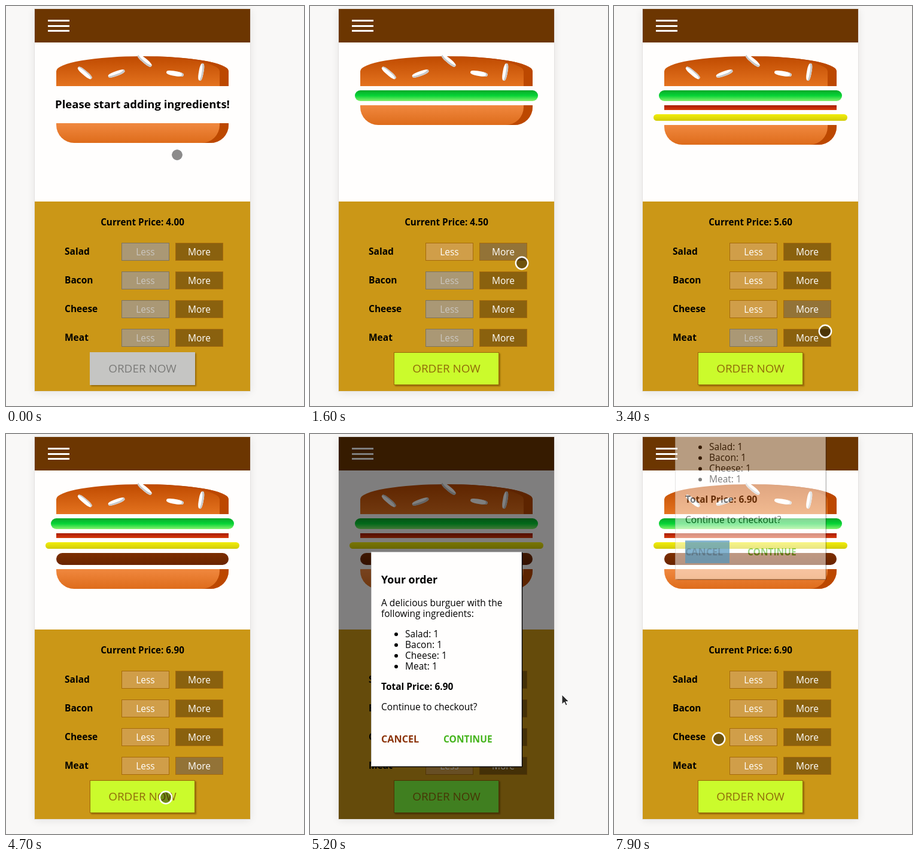
An HTML page that plays this animation: 498 px wide and 669 px high, repeating every 8000 ms.

```html
<!DOCTYPE html>
<html lang="en">
<head>
<meta charset="utf-8">
<title>Burger builder</title>
<style>
  html, body { margin: 0; width: 100%; height: 100%; overflow: hidden; background: #f9f8f7; }
  body { position: relative; font: 15.5px/18px 'Open Sans', 'Noto Sans', sans-serif; color: #000; }
  * { box-sizing: border-box; }
  [hidden] { display: none !important; }

  #frame, #phone { position: absolute; left: 48px; top: 5px; width: 360px; height: 639px; }
  #frame { box-shadow: 0 0 0 1px #e4e2e0, 0 2px 14px rgba(0, 0, 0, .09); }
  #phone { overflow: hidden; background: #fffefd; }
  #phone > * { position: absolute; }
  #header { width: 100%; height: 56px; background: #6c3601; }
  #header i { display: block; width: 36px; height: 3px; margin: 0 0 5.5px 22px; background: #fff; }
  #header i:first-child { margin-top: 18px; }
  #panel { top: 322px; width: 100%; bottom: 0; background: #cb9717; }
  #price { top: 347px; width: 100%; text-align: center; font-size: 15.25px; }

  #burger { top: 72px; width: 100%; }
  #burger > div { margin: 7.2px auto; width: 80%; }
  #burger .top { position: relative; height: 50px; border-radius: 50% 50% 0 0;
    background: linear-gradient(#bf4a00, #e4731f); box-shadow: inset -15px 0 #bc4800; }
  #burger .bottom { height: 32.5px; border-radius: 0 0 30px 30px;
    background: linear-gradient(#f0883f, #de6c1b); box-shadow: inset -15px 0 #bc4800; }
  #burger .salad { width: 85%; height: 17.5px; border-radius: 20px;
    background: linear-gradient(#08a82a, #06d436 50%, #86f06c); }
  #burger .bacon { height: 7.5px; background: linear-gradient(#a81c00, #d83a0c); }
  #burger .cheese { width: 90%; height: 11.25px; border-radius: 20px;
    background: linear-gradient(#f2ee08, #d2cc08); }
  #burger .meat { height: 20px; border-radius: 15px; background: linear-gradient(#7c2e00, #6a2400); }
  #burger .msg { width: 100%; height: 62px; margin: -7.2px 0; line-height: 60px;
    text-align: center; font-size: 18.5px; font-weight: 700; }

  .seed, .seed::before, .seed::after { position: absolute; width: 28.8px; height: 7.5px;
    border-radius: 40%; background: #fff; }
  .seed { top: 50%; left: 30%; transform: rotate(-20deg); box-shadow: inset -2px -3px #c9c9c9; }
  .seed::before { content: ""; left: 180%; top: -50%; transform: rotate(60deg);
    box-shadow: inset -1px -3px #c9c9c9; }
  .seed::after { content: ""; left: -170%; top: -260%; transform: rotate(60deg);
    box-shadow: inset -1px 2px #c9c9c9; }
  .seed.right { left: 64%; transform: rotate(10deg); box-shadow: inset -3px 0 #c9c9c9; }
  .seed.right::before { left: 150%; top: -130%; transform: rotate(90deg); box-shadow: inset 1px 3px #c9c9c9; }
  .seed.right::after { display: none; }

  #controls { top: 391px; width: 100%; }
  .row { display: flex; height: 30px; margin-bottom: 18px; padding-left: 50px; line-height: 29px; }
  .row b { width: 95px; }
  .row span { width: 80px; margin-right: 10px; line-height: 28px; text-align: center;
    border: 1px solid #a66a0c; color: #fff; }
  .less { background: #d09e49; }
  .less.off { background: #aa9875; border-color: #7d7361; color: #cac6c0; }
  .more { background: #8a610e; }
  .more.focus { background: #937337; }
  #order { left: 92px; top: 574px; width: 176px; height: 55px; line-height: 53px;
    text-align: center; font-size: 18.9px; border: 1px solid #966909; color: #8f6a0a;
    background: #cbfb2c; box-shadow: 2px 2px 2px #966909; }
  #order.off { background: #c5c5c3; border-color: #c5c5c3; color: #7b7b79; }
  #order.hover { background: #80ff40; }

  #backdrop { inset: 0; background: rgba(0, 0, 0, .5); }
  #modal { left: 54px; top: 192px; width: 252px; height: 359px; padding: 0 16px; background: #fffefd;
    border: 1px solid #ccc; box-shadow: 1px 1px 1px #000; }
  #modal h3 { margin: 34.7px 0 18.7px; font-size: 17.8px; line-height: 21.5px; }
  #modal p, #modal ul { margin: 16px 0; }
  #modal ul { padding-left: 40px; }
  #modal b.choice { display: inline-block; margin: 10px 10px 10px 0; padding: 10px 10px 10px 0; }
  #modal .cancel { color: #8c340a; font-size: 16.2px; }
  #modal .continue { color: #45b41c; position: absolute; left: 120px; }
  #tap { left: 71px; width: 74px; height: 38px; background: rgba(80, 150, 190, .7); }
  #pointer { position: absolute; left: 0; top: 0; overflow: visible; }
</style>
</head>
<body>
<div id="frame"></div>
<div id="phone">
  <div id="header"><i></i><i></i><i></i></div>
  <div id="burger">
    <div class="top"><span class="seed"></span><span class="seed right"></span></div>
    <div class="msg">Please start adding ingredients!</div>
    <div class="bottom"></div>
  </div>
  <div id="panel"></div>
  <b id="price"></b>
  <div id="controls"></div>
  <div id="order">ORDER NOW</div>
  <div id="backdrop"></div>
  <div id="modal">
    <h3>Your order</h3>
    <p>A delicious burguer with the<br>following ingredients:</p>
    <ul></ul>
    <p><b>Total Price: 6.90</b></p>
    <p>Continue to checkout?</p>
    <b class="choice cancel">CANCEL</b><b class="choice continue">CONTINUE</b>
  </div>
  <div id="tap"></div>
</div>
<svg id="pointer" width="1" height="1">
  <g id="touch">
    <circle r="9.2" fill-opacity=".45"/>
    <circle r="10.2" fill="none" stroke="#fff" stroke-width="2.4"/>
  </g>
  <path id="arrow" d="M0 0V16L4 12.5L6.5 18L9 17L6.5 11.5H11.5Z" fill="#2b2b2b" stroke="#fff"/>
</svg>
<script>
const $ = selector => document.querySelector(selector);
const LOOP = 8000, STEP = 100, GLIDE = 400, SLIDE = 300;
const OPEN = 4800, CLOSE = 7800;
const items = [
  { name: 'Salad', price: 0.5, added: 1300 },
  { name: 'Bacon', price: 0.7, added: 2200 },
  { name: 'Cheese', price: 0.4, added: 2900 },
  { name: 'Meat', price: 1.3, added: 4000 }
];

// Where the pointer comes to rest, and when it arrives
const stops = [
  { at: 0, x: 286, y: 249 },
  { at: 800, x: 335, y: 411 },
  { at: 1600, x: 354, y: 430 },
  { at: 2000, x: 346, y: 461 },
  { at: 2400, x: 370, y: 494 },
  { at: 2900, x: 346, y: 507 },
  { at: 3400, x: 353, y: 544 },
  { at: 3800, x: 343, y: 552 },
  { at: 4700, x: 267, y: 608 },
  { at: 5200, x: 421, y: 436 },
  { at: 5700, x: 204, y: 519 },
  { at: 6500, x: 247, y: 518 },
  { at: 7000, x: 240, y: 520 },
  { at: 7600, x: 175, y: 510 }
];

function add(parent, tag, className, label = '') {
  const el = document.createElement(tag);
  el.className = className;
  el.textContent = label;
  parent.append(el);
  return el;
}

for (const item of items) {
  const row = add($('#controls'), 'div', 'row');
  add(row, 'b', '', item.name);
  item.less = add(row, 'span', 'less', 'Less');
  item.more = add(row, 'span', 'more', 'More');
  item.layer = add($('#burger'), 'div', item.name.toLowerCase());
  add($('#modal ul'), 'li', '', item.name + ': 1');
}
$('#burger').append($('.bottom'));

const clamp = p => Math.min(1, Math.max(0, p));
const easeOut = p => 1 - (1 - clamp(p)) ** 1.655;
const smooth = p => p * p * (3 - 2 * p);

function pointerAt(t) {
  let { x, y } = stops[0];
  for (const stop of stops) {
    const p = smooth(clamp((t - stop.at) / GLIDE + 1));
    x += (stop.x - x) * p;
    y += (stop.y - y) * p;
  }
  return { x, y };
}

function render(t) {
  const added = items.filter(item => t >= item.added);
  const open = t > OPEN && t <= CLOSE;
  for (const item of items) {
    const has = added.includes(item);
    item.layer.hidden = !has;
    item.less.classList.toggle('off', !has);
    item.more.classList.toggle('focus', item === added.at(-1) && t <= OPEN);
  }
  const total = added.reduce((sum, item) => sum + item.price, 4);
  $('.msg').hidden = added.length > 0;
  $('#price').textContent = 'Current Price: ' + total.toFixed(2);
  $('#order').className = open ? 'hover' : added.length ? '' : 'off';

  const shown = easeOut((t - OPEN) / SLIDE) - easeOut((t - CLOSE) / SLIDE);
  const slide = `translateY(${640 * (shown - 1)}px)`;
  $('#backdrop').hidden = !open;
  $('#modal').hidden = shown <= 0;
  $('#modal').style.opacity = shown;
  $('#modal').style.transform = slide;
  $('#tap').hidden = t <= CLOSE;
  $('#tap').style.top = '486px';
  $('#tap').style.transform = slide;

  const { x, y } = pointerAt(t);
  const outside = x > 408;
  $('#touch').style.display = outside ? 'none' : '';
  $('#arrow').style.display = outside ? '' : 'none';
  $('#pointer').style.transform = `translate(${x}px, ${y}px)`;
}

const start = performance.now();
function tick() {
  const t = (performance.now() - start) % LOOP;
  render(Math.floor(t / STEP) * STEP);
  requestAnimationFrame(tick);
}
tick();
</script>
</body>
</html>
```
